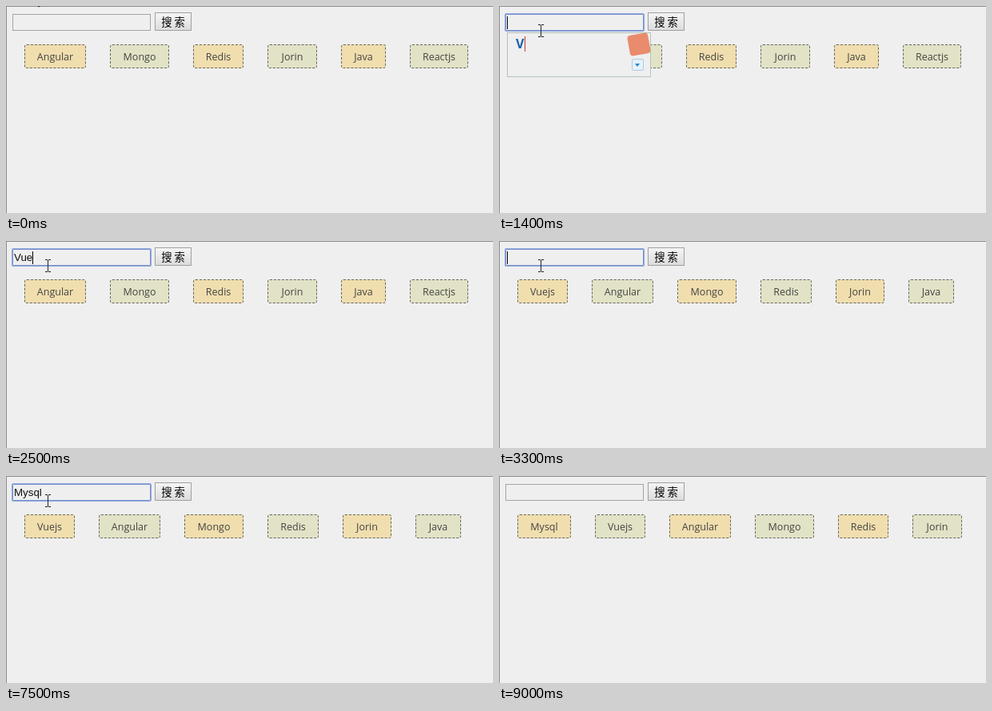
An HTML page for the animation above (9100 ms loop, 609 by 259 pixels).

```html
<!DOCTYPE html>
<html lang="zh">
<head>
<meta charset="utf-8">
<title>Search tags</title>
<style>
html, body { margin: 0; width: 100%; height: 100%; overflow: hidden; background: #efefef; }
#stage { position: relative; width: 609px; height: 259px; overflow: hidden; background: #efefef; }
#stage * { position: absolute; box-sizing: border-box; white-space: pre; }
#edge { inset: 0; border: solid #8b8b8b; border-width: 1px 0 0 1px; }
#field { left: 8px; top: 10px; width: 173px; height: 21px; border: 1px solid #a5a5a5; }
#field.focus { border-color: #7690cf; box-shadow: 0 0 0 1px #90a6dc; border-radius: 1px; }
#typed { left: 1px; top: 1px; font: 13.333px/17px "Liberation Sans", Arial, sans-serif; color: #111; }
#caret { top: 2px; width: 1px; height: 16px; background: #000; }
#button {
  left: 186px; top: 8px; width: 46px; height: 23px; border: 1px solid #a0a0a0;
  background: linear-gradient(#f5f5f5, #dcdcdc); color: #000; text-align: center;
  font: 13.333px/21px "Noto Sans CJK SC", "Noto Sans CJK", sans-serif;
}
.tag {
  top: 48px; height: 30px; border: 1px dashed #666; border-radius: 3px; background: #f0deae;
  color: #444; text-align: center; font: 12.5px/29px "Open Sans", "Noto Sans", sans-serif;
}
.tag:nth-child(even) { background: #e2e2c6; }
#popup { left: 10px; top: 33px; height: 56px; background: #efefef; border: 1px solid #b4c3bc; }
#word { left: 10px; top: 3px; font: bold 16px/20px "Open Sans", sans-serif; color: #1a62ae; }
#word i { left: 100%; top: 1px; margin-left: 1px; width: 1px; height: 19px; background: #c33; }
#picks { left: 10px; top: 32px; font: 13px/18px "Open Sans", sans-serif; color: #1a62ae; }
#badge { right: 1px; top: 1px; width: 26px; height: 26px; border-radius: 4px; background: #e98c6d; transform: rotate(-10deg); }
#more { right: 8px; top: 32px; width: 15px; height: 15px; border: 1px solid #a9cde5; border-radius: 2px; background: #e7f1f8; }
#more i { left: 3px; top: 5px; border: solid transparent; border-width: 4px 3.5px 0; border-top-color: #2688cc; }
svg { left: 0; top: 0; overflow: visible; }
</style>
</head>
<body>
<div id="stage">
  <div id="edge"></div>
  <div id="field"><span id="typed"></span><i id="caret"></i></div>
  <div id="button">搜 索</div>
  <div id="tags"></div>
  <div id="popup">
    <span id="word"><span id="letters" style="position:static"></span><i></i></span>
    <span id="picks"></span>
    <b id="badge"></b>
    <b id="more"><i></i></b>
  </div>
  <svg id="beam" width="8" height="17"><path d="M0 .5h3M4 .5h3M3.5 1v14M0 15.5h3M4 15.5h3" fill="none" stroke="#222"/></svg>
  <svg id="arrow" width="12" height="19"><path d="M.5 .5v15l3.5-3.2 2.5 5.7 2.5-1-2.5-5.5h5z" fill="#fff" stroke="#222"/></svg>
</div>
<script>
const LOOP = 9100;
const $ = id => document.getElementById(id);

// label, left, width
const rows = [
  [["Angular", 23, 77], ["Mongo", 130, 74], ["Redis", 234, 63], ["Jorin", 327, 62], ["Java", 419, 56], ["Reactjs", 505, 73]],
  [["Vuejs", 23, 63], ["Angular", 116, 77], ["Mongo", 223, 74], ["Redis", 327, 64], ["Jorin", 421, 61], ["Java", 512, 57]],
  [["Mysql", 23, 67], ["Vuejs", 120, 63], ["Angular", 213, 77], ["Mongo", 320, 74], ["Redis", 424, 63], ["Jorin", 517, 62]]
];

// time, value
const typing = [[0, ""], [2300, "Vue"], [2800, "Vuej"], [3000, "Vuejs"], [3300, ""],
  [6200, "M"], [6500, "My"], [6800, "Mys"], [6900, "Mysq"], [7000, "Mysql"], [7800, ""]];
const blink = [[0, 0], [400, 1], [900, 0], [1400, 1], [1900, 0], [2300, 1], [3800, 0], [4300, 1], [4800, 0],
  [5200, 1], [5700, 0], [6200, 1], [7500, 0], [7800, 1], [8300, 0], [8800, 1], [9000, 0]];
const focus = [[0, 0], [400, 1], [9000, 0]];
const list = [[0, 0], [3300, 1], [7800, 2]];
const popup = [[0, null], [1400, ["V", 180, 1]], [1700, ["Vu", 180, 1]], [1800, ["Vu", 294, 1]],
  [1900, ["Vue", 294, 1]], [2300, ["Vue", 294, .6]], [2400, ["Vue", 294, .25]], [2500, null]];
const pointer = [[0, ["arrow", 34, -17]], [100, ["beam", 41, 3]], [200, ["beam", 46, 15]], [300, ["beam", 49, 23]],
  [8400, ["beam", 49, 19]], [8500, ["beam", 48, 12]], [8600, ["beam", 46, 4]],
  [8700, ["arrow", 44, -6]], [8800, ["arrow", 42, -12]], [8900, ["arrow", 38, -17]], [9000, null]];

const at = (track, t) => track.findLast(step => step[0] <= t)[1];
const show = (el, on) => { el.style.visibility = on ? "visible" : "hidden"; };

let shown = -1;
function showTags(n) {
  if (n === shown) return;
  shown = n;
  $("tags").replaceChildren(...rows[n].map(([label, x, w]) => {
    const tag = document.createElement("div");
    tag.className = "tag";
    tag.textContent = label;
    tag.style.left = x + "px";
    tag.style.width = w + "px";
    return tag;
  }));
}

function draw(t) {
  showTags(at(list, t));
  $("field").className = at(focus, t) ? "focus" : "";
  $("typed").textContent = at(typing, t);
  $("caret").style.left = 1 + Math.floor($("typed").getBoundingClientRect().width) + "px";
  show($("caret"), at(blink, t));

  const box = at(popup, t);
  $("popup").style.display = box ? "block" : "none";
  if (box) {
    const [word, width, opacity] = box;
    $("letters").textContent = word;
    $("picks").textContent = width > 180 ? "1." + word : "";
    $("popup").style.width = width + "px";
    $("popup").style.opacity = opacity;
  }

  const [kind, x, y] = at(pointer, t) || [];
  for (const id of ["beam", "arrow"]) {
    show($(id), id === kind);
    if (id === kind) $(id).style.transform = `translate(${x}px, ${y}px)`;
  }
}

const start = performance.now();
function tick() {
  draw((performance.now() - start) % LOOP);
  requestAnimationFrame(tick);
}
tick();
</script>
</body>
</html>
```
